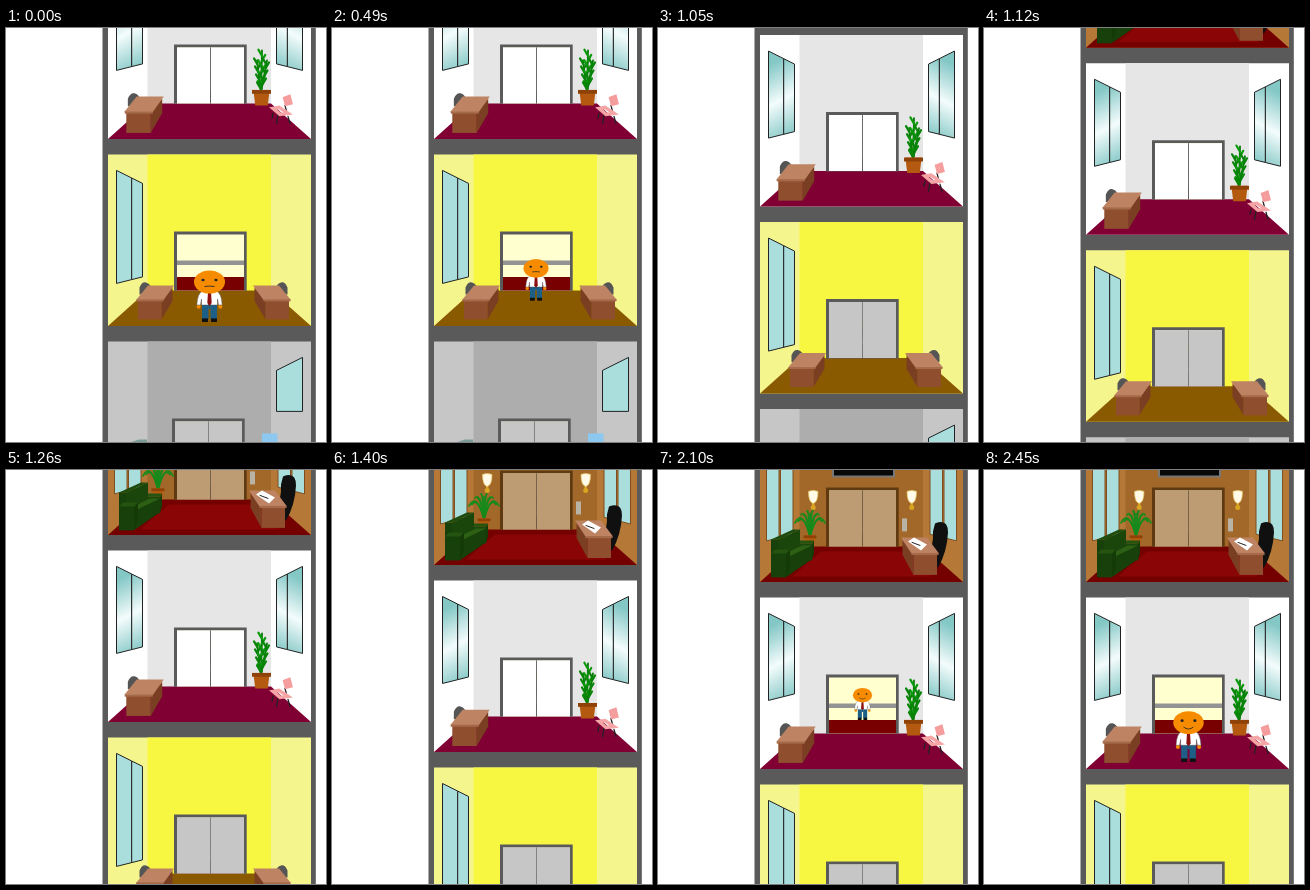
These frames come from a looping animation (320x414 px, 2.52 s). An HTML page:

```html
<!DOCTYPE html>
<html lang="en">
<head>
<meta charset="utf-8">
<title>Elevator</title>
<style>
  html, body { margin: 0; height: 100%; overflow: hidden; background: #fff; }
  svg { display: block; width: 100vw; height: 100vh; }
</style>
</head>
<body>
<svg id="stage" viewBox="0 0 320 414"></svg>
<script>
const PITCH = 187, TOP = 126.4, STEP = 70, LOOP = 2520;
const WALL = '#5a5a5a', GLASS = '#a9dedd', ORANGE = '#f68b00';

const path = (d, fill, extra = '') => `<path d="${d}" fill="${fill}" ${extra}/>`;
const line = (d, color, width = 1) =>
  path(d, 'none', `stroke="${color}" stroke-width="${width}" stroke-linecap="round"`);
const rect = (x, y, w, h, fill, extra = '') => path(`M${x} ${y}h${w}v${h}h${-w}z`, fill, extra);
const oval = (x, y, rx, ry, fill) => `<ellipse cx="${x}" cy="${y}" rx="${rx}" ry="${ry}" fill="${fill}"/>`;
const group = (transform, body) => `<g transform="${transform}">${body}</g>`;
const mirror = (body, axis = 203.5) => group(`translate(${2 * axis} 0) scale(-1 1)`, body);
const each = (n, draw) => Array.from({ length: n }, (_, i) => draw(i)).join('');

// A solid block: front face, then side and top receding by (dx, -dy).
const block = (x, y, w, h, dx, dy, front, top, side) =>
  path(`M${x + w} ${y}l${dx} ${-dy}v${h * .72}L${x + w} ${y + h}z`, side) + rect(x, y, w, h, front) +
  path(`M${x} ${y}l${dx} ${-dy}h${w}l${-dx} ${dy}z`, top);

// Window panes follow the perspective of the left wall.
const pane = (x, w, bottom, fill = GLASS, edge = '#222', rise = .25) => {
  const high = .5 * (x - 110.5) + 16, low = bottom - rise * (x - 110.5);
  return path(`M${x} ${high}l${w} ${w / 2}V${low - rise * w}L${x} ${low}z`, fill, `stroke="${edge}"`);
};
const sash = (bottom, fill) => pane(110.5, 15.2, bottom, fill) + pane(125.7, 10.8, bottom, fill);

const deskBody = block(132, 146, 23.5, 19, 11, 13, '#8f4f2e', '#bd8362', '#7a3f22') +
  path('M130 145.5L142 131H168L157.5 145.5z', '#bd8362') + rect(130.5, 145, 27, 2, '#a56a49');
const desk = path('M133.5 140V133Q136 127 140 128Q145 129 145.5 136V140z', '#555') + deskBody;

const pot = (x, y, w, h) =>
  path(`M${x - w * .43} ${y}h${w * .86}l${-w * .1} ${h}h${-w * .66}z`, '#b45a10') +
  rect(x - w / 2, y, w, h * .25, '#8f4208');

const tallPlant = each(3, s => {
  const lean = s * 5 - 4, top = s === 1 ? 83 : 93;
  return line(`M255 125L${255 + lean} ${top}`, '#087808', 1.8) + each(7, i => {
    const p = (i + 1) / 8, x = 255 + lean * p, y = 125 + (top - 125) * p;
    return line(`M${x} ${y}l${i % 2 ? 3.5 : -3.5} -6`, s % 2 ? '#0a9a0a' : '#088408', 2.2);
  });
}) + pot(255.5, 122.5, 19, 15.5);

const palm = each(11, i => {
  const d = 3 * (i - 5);
  return line(`M152 126Q${152 + d * .5} ${98 + i % 2 * 5} ${152 + d} ${100 + d * d / 18 + i % 2 * 3}`, '#168a1c', 1.7);
}) + pot(152, 125, 13, 11);

const pinkChair = line('M272 148l-1.5 8M267 146l-1 5M282 149l2 7M279 138l2 8', '#222', 1.3) +
  line('M279 131l4 -1.5l1.5 6l-4 1z', '#f59c9c', 4) + line('M267 141l6 -1l9 6l-8 1z', '#f5a5a5', 3.5);

const sconce = rect(154, 90, 2.4, 8, '#d9a520') + oval(155.2, 97, 2.5, 2.5, '#d9a520') +
  path('M150.5 81Q155 79 160 81Q160 92 155.2 93Q150.5 92 150.5 81z', '#fffbe8', 'stroke="#e8c860" stroke-width=".7"');

const sofa =
  block(139, 133, 15, 17, 2, 3, '#1b460c', '#24540f', '#163c09') +
  block(113, 129, 7, 37, 22, 10, '#17400a', '#1f4c0d', '#1a450b') +
  block(119, 147, 10, 19, 25, 12, '#1b460c', '#2d6014', '#17400a') +
  block(113, 143, 15, 24, 4, 4, '#17400a', '#24540f', '#143a08');

const lounge = path('M163 141H250L274 166H134z', '#8a0606') +
  rect(174, 50, 63, 17, '#777') + rect(176, 50, 59, 15, '#080808') +
  sconce + group('translate(98.5 0)', sconce) + rect(244, 108, 5, 13, '#b9b3a6') + palm + sofa +
  path('M277 113Q290 108 290 122Q289 142 280 157L268 152Q276 135 275 121z', '#101010') +
  group('translate(-4 -17) scale(1 1.1)', mirror(deskBody, 207.5)) +
  path('M250 131L256 127L269 134L263 140z', '#fff') + line('M254 132l8 3', '#222');
const loungeWindows = each(2, i => pane(108.5 + 14 * i, 12.5, 130, GLASS, '#7d4f20'));

const room = (n, [back, side, floor], body, frame = WALL, x = 0) => group(`translate(0 ${TOP + n * PITCH})`,
  rect(102, 0, 203, 171.5, side) + rect(141.5, 0, 123.5, 137, back) +
  path('M102 171.5L141.5 136H265L305 171.5z', floor) +
  rect(168 + x, 77, 72.7, 59.3, frame) + rect(171 + x, 80, 67, 56, '#ffffd0') +
  rect(171 + x, 106, 67, 4.5, '#939393') + rect(171 + x, 122.5, 67, 13.5, '#780000') + body);

const doors = (id, n, fill, edge, x = 0) => {
  const panel = rect(171, 80, 33.5, 56, fill) + rect(204, 80, .6, 56, edge);
  return `<g id="${id}" transform="translate(${x} ${TOP + n * PITCH})"><g>${panel}</g><g>${panel}</g></g>`;
};

// One half of the body is drawn and mirrored; the origin is between the feet.
const half = rect(1, -18, 6.5, 15, '#1d5f86') + rect(1.5, -3.6, 6, 3.6, '#111') +
  oval(10.8, -15.5, 2, 2.3, ORANGE) +
  path('M0 -31H7Q12 -29 12.7 -17H9L8 -23V-17H0', '#fff', 'stroke="#555" stroke-width=".5"');
const man = half + mirror(half, 0) + rect(-1.2, -18, 2.4, 5, '#1d5f86') +
  path('M-1.5 -30h3l.7 11l-2.2 3l-2.2 -3z', '#8c1010') +
  oval(0, -40, 15.5, 11.6, ORANGE) + oval(-6.5, -42, 1.6, 1.3, '#222') + oval(6.5, -42, 1.6, 1.3, '#222') +
  '<path id="mouth" fill="none" stroke="#432"/>';

stage.innerHTML = `
  <linearGradient id="shine" gradientUnits="userSpaceOnUse" x1="108" y1="32" x2="142" y2="96">
    <stop stop-color="#84c8c6"/><stop offset=".5" stop-color="#f4fcfc"/><stop offset="1" stop-color="#84c8c6"/>
  </linearGradient>
  ${rect(96.5, 0, 213.3, 414, WALL)}
  <g id="building">
    ${room(-2, ['#a2682a', '#b57836', '#740000'], loungeWindows + mirror(loungeWindows) + lounge, '#5f3a10')}
    ${room(-1, ['#e6e6e6', '#fff', '#800033'], sash(103, 'url(#shine)') + mirror(sash(103, 'url(#shine)')) +
      group('translate(-17 -11) scale(1.04 1.07)', desk) + tallPlant + pinkChair)}
    ${room(0, ['#f7f742', '#f5f58d', '#8a5a00'], sash(129) + desk + mirror(desk, 207.5))}
    ${room(1, ['#adadad', '#c6c6c6', '#777'], mirror(pane(110.5, 26, 70, GLASS, '#222', 0)) +
      rect(256, 92, 15.5, 20, '#8cc8f0') + path('M124 101L133 98H141V103z', '#7a9c98'), WALL, -2)}
    <g id="man">${man}</g>
    ${doors('loungeDoors', -2, '#bd9c73', '#5a4a38')}
    ${doors('whiteDoors', -1, '#fff', '#333')}
    ${doors('yellowDoors', 0, '#c6c6c6', '#666')}
    ${doors('greyDoors', 1, '#c6c6c6', '#666', -2)}
  </g>`;

const byId = id => document.getElementById(id);
const ramp = (k, from, length) => Math.min(1, Math.max(0, (k - from) / length));
const mix = (a, b, p) => a + (b - a) * p;

function setDoors(id, closed) {
  const [left, right] = byId(id).children, shift = 171 * (1 - closed);
  byId(id).style.display = closed ? '' : 'none';
  left.setAttribute('transform', `translate(${shift} 0) scale(${closed} 1)`);
  right.setAttribute('transform', `translate(${409 - shift} 0) scale(${-closed} 1)`);
}

function placeMan(floor, x, feet, size, smile) {
  byId('man').setAttribute('transform', `translate(${x} ${TOP + floor * PITCH + feet}) scale(${size})`);
  byId('mouth').setAttribute('d', `M-5 -35.5q5 ${smile} 10 0`);
}

function draw(now) {
  const k = Math.floor(now % LOOP / STEP);
  const rise = ramp(k, 13, 10);
  byId('building').setAttribute('transform', `translate(0 ${188 * rise * (2 - rise)})`);
  setDoors('yellowDoors', ramp(k, 9, 4));
  setDoors('whiteDoors', 1 - ramp(k, 23, 7));

  if (k < 18) {
    const p = ramp(k, 1, 12);
    placeMan(0, mix(203.5, 204.5, p), mix(167.6, 125, p), mix(1, .62, p), -.8);
  } else {
    const p = ramp(k, 30, 5);
    placeMan(-1, 204.5, mix(122.6, 164.6, p), mix(.62, .985, p), 4);
  }
}

setDoors('loungeDoors', 1);
setDoors('greyDoors', 1);
const start = performance.now();
(function tick() {
  draw(performance.now() - start);
  requestAnimationFrame(tick);
})();
</script>
</body>
</html>
```
